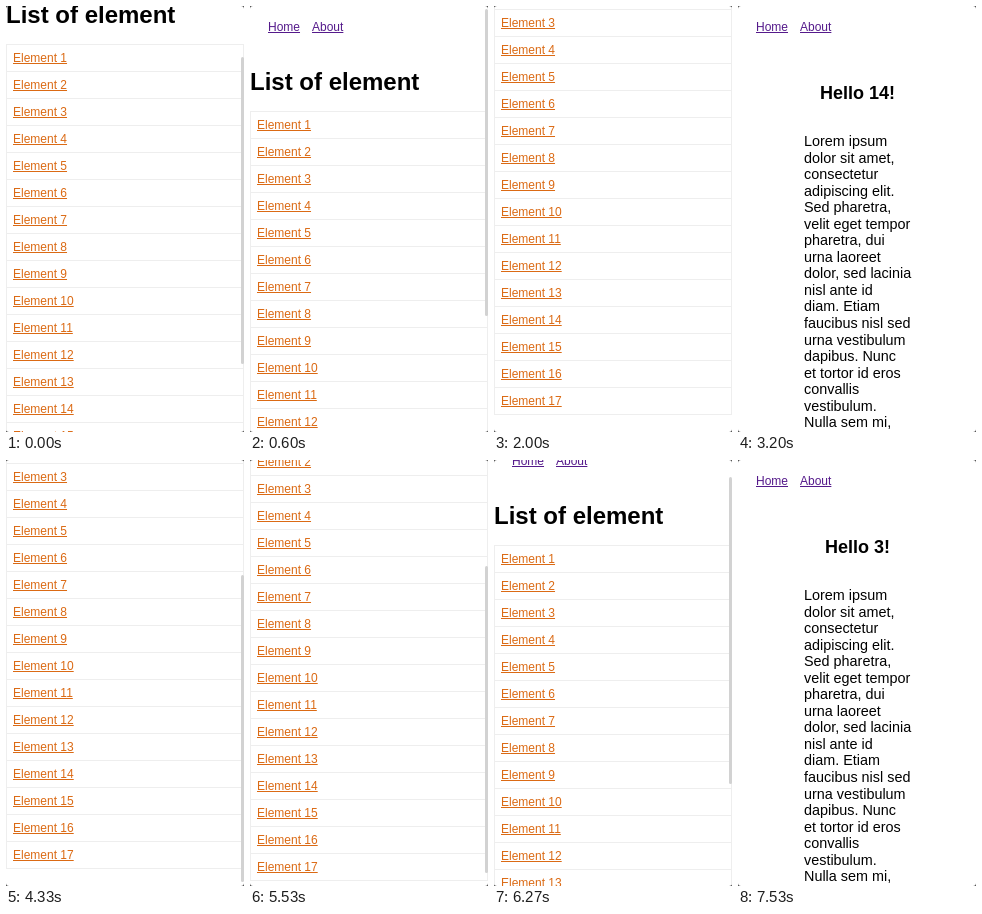
Recreate the animation shown at these times as an HTML page. Size 238x426 px, loop 8 s.

```html
<!DOCTYPE html>
<html lang="en">
<head>
<meta charset="utf-8">
<title>List of element</title>
<style>
html, body { margin: 0; width: 100%; height: 100%; overflow: hidden; background: #444; }
#screen { position: relative; width: 238px; height: 426px; overflow: hidden; border-radius: 3px;
  background: #fff; color: #000; font: 12px "Liberation Sans", Arial, sans-serif; }
.page { position: absolute; inset: 0; will-change: transform; }
nav { position: absolute; left: 18px; top: 14px; line-height: 14px; }
nav a { float: left; margin-right: 12px; color: #551a8b; text-decoration: underline; }
h1, h2, p, ul { position: absolute; margin: 0; padding: 0; white-space: pre; }
h1 { left: 0; top: 62px; font-size: 24px; line-height: 27px; }
ul { left: 0; right: 0; top: 105px; list-style: none; border: solid #eee; border-width: 1px 1px 0; }
li { height: 26px; padding-left: 6px; border-bottom: 1px solid #eee; line-height: 26px; }
li a { color: #db6a14; text-decoration: underline; }
h2 { left: 1px; width: 237px; top: 77px; font-size: 18px; line-height: 20px; text-align: center; }
p { left: 66px; top: 127px; font-size: 14.4px; line-height: 16.54px; }
#bar { position: absolute; left: 235px; width: 3px; border-radius: 1.5px; background: #d2d2d2; }
</style>
</head>
<body>
<div id="screen">
  <div class="page" id="list">
    <nav><a>Home</a><a>About</a></nav>
    <h1>List of element</h1>
    <ul id="rows"></ul>
  </div>
  <div class="page" id="detail">
    <nav><a>Home</a><a>About</a></nav>
    <h2 id="hello"></h2>
    <p>Lorem ipsum
dolor sit amet,
consectetur
adipiscing elit.
Sed pharetra,
velit eget tempor
pharetra, dui
urna laoreet
dolor, sed lacinia
nisl ante id
diam. Etiam
faucibus nisl sed
urna vestibulum
dapibus. Nunc
et tortor id eros
convallis
vestibulum.
Nulla sem mi,</p>
  </div>
  <div id="bar"></div>
</div>
<script>
const LOOP = 8000;
const [list, detail, rows, hello, bar] =
  ['list', 'detail', 'rows', 'hello', 'bar'].map(id => document.getElementById(id));

for (let i = 1; i <= 17; i++) rows.innerHTML += `<li><a>Element ${i}</a></li>`;

// Scroll moves: start, end, from, to, ease-out power
const moves = [
  [0, 470, 67, 0, 2],
  [960, 1400, 0, 156, 1.6],
  [5475, 5800, 156, 85, 1],
  [5800, 6130, 85, 20, 1.5],
];
// Detail visits: start, end, element number
const visits = [[2730, 4270, 14], [7000, LOOP, 3]];
// Scrollbar: shown from, fade start, gone
const bars = [
  [0, 800, 870], [995, 1730, 1800], [2795, 3130, 3200], [4325, 4660, 4730],
  [5525, 6500, 6700], [7065, 7440, 7530],
];

const clamp = x => Math.min(1, Math.max(0, x));

function scrollAt(t) {
  const [start, end, from, to, power] = moves.findLast(m => t >= m[0]);
  return from + (to - from) * (1 - (1 - clamp((t - start) / (end - start))) ** power);
}

function draw(t) {
  const y = Math.round(scrollAt(t));
  const visit = visits.find(v => t >= v[0] && t < v[1]);
  list.style.display = visit ? 'none' : '';
  detail.style.display = visit ? '' : 'none';
  list.style.transform = `translateY(${-y}px)`;
  if (visit) hello.textContent = `Hello ${visit[2]}!`;

  const [, fade, gone] = bars.findLast(b => t >= b[0]);
  bar.style.opacity = clamp((gone - t) / (gone - fade));
  bar.style.top = (visit ? 3 : 3 + Math.round(y * 0.715)) + 'px';
  bar.style.height = (visit ? 81 : 307) + 'px';
}

const begin = performance.now();
function tick() {
  draw((performance.now() - begin) % LOOP);
  requestAnimationFrame(tick);
}
tick();
</script>
</body>
</html>
```
